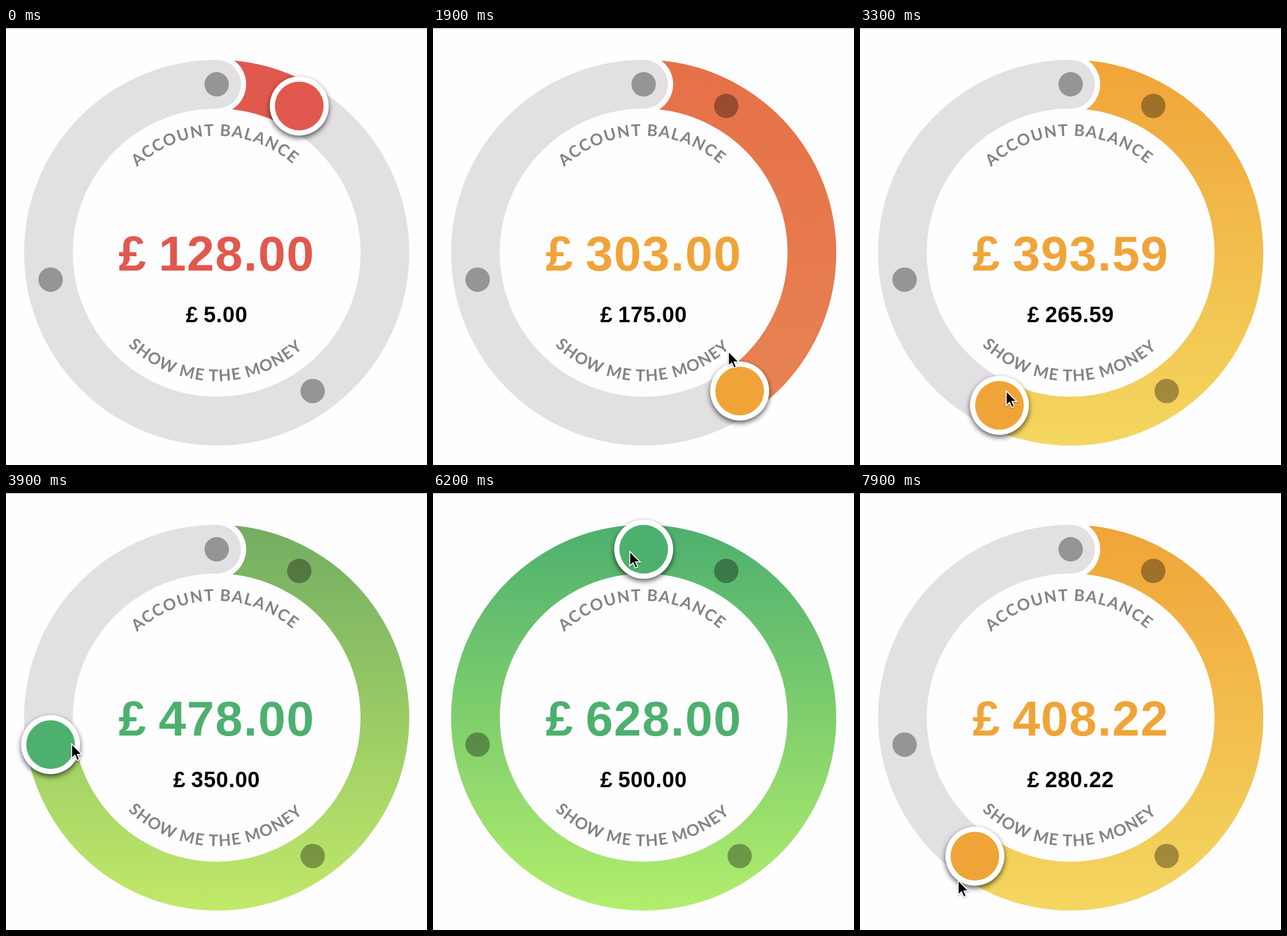
Write an HTML page that moves like this. It is 735 px wide and 762 px high and loops after 8 s.

```html
<!DOCTYPE html>
<html lang="en">
<head>
<meta charset="utf-8">
<title>Account dial</title>
<style>
  html, body { margin: 0; width: 100%; height: 100%; overflow: hidden; background: #fefdff; }
  svg { display: block; }
  .label { font: 700 28px Lato, sans-serif; fill: #858285; text-anchor: middle; }
  .money { font-family: "Liberation Sans", Arial, sans-serif; font-weight: 700; text-anchor: middle; }
  #total { font-size: 86px; letter-spacing: 1.6px; word-spacing: -5px; }
  #amount { font-size: 38px; letter-spacing: .7px; word-spacing: -2px; }
  #knob { filter: drop-shadow(0 4px 5px rgba(0, 0, 0, .65)); }
  #cursor { filter: drop-shadow(0 1px 1px rgba(0, 0, 0, .35)); }
</style>
</head>
<body>
<svg width="735" height="762" viewBox="0 0 735 762">
  <defs>
    <linearGradient id="fade" gradientUnits="userSpaceOnUse" x1="0" y1="-336" x2="0" y2="336">
      <stop id="stop0"/><stop id="stop1" offset="1"/>
    </linearGradient>
    <path id="upper" d="M-204 0A204 204 0 0 1 204 0"/>
    <path id="lower" d="M-224 0A224 224 0 0 0 224 0"/>
  </defs>
  <rect width="735" height="1" fill="#b4b3b4"/>

  <g transform="translate(367.8 391.8)">
    <g fill="none" stroke-width="85">
      <circle r="293.7" stroke="#e3e0e4"/>
      <path id="arc" d="M0-293.7a293.7 293.7 0 1 1-.01 0" pathLength="360" stroke="url(#fade)"/>
    </g>
    <path d="M0-345.2a51.5 51.5 0 0 1 0 103z" fill="#fefdff"/>
    <circle cy="-293.7" r="42.5" fill="#e3e0e4"/>
    <g id="dots" fill-opacity=".34"></g>

    <text class="label" letter-spacing="1.9" transform="rotate(-.9)">
      <textPath href="#upper" startOffset="50%">ACCOUNT BALANCE</textPath>
    </text>
    <text class="label" letter-spacing="1.6" transform="rotate(.6)">
      <textPath href="#lower" startOffset="50%">SHOW ME THE MONEY</textPath>
    </text>
    <text id="total" class="money" y="31"></text>
    <text id="amount" class="money" y="121"></text>

    <g id="knob">
      <circle r="51.5" fill="#fff"/>
      <circle id="face" r="42.5"/>
    </g>
    <path id="cursor" d="M0 0V25.5L5.8 20 9.8 29 14 27.2 10.2 18.4H18.3Z" stroke="#fff" stroke-width="1.8"/>
  </g>
</svg>
<script>
const $ = id => document.getElementById(id);
const LOOP = 8000, STEP = 100, FADE = 400, GRAB = 900;
const RADIUS = 293.7, OPENING = 128, SNAP = 7;

// Marked positions: angle clockwise from the top, and the amount there
const marks = [[29.4, 5], [145.2, 175], [260.8, 350], [360, 500]];

// The drag: time, pointer angle, pointer radius
const drag = [
  [GRAB, 29.4, 285], [1800, 138, 226], [2700, 150, 235], [3300, 205.04, 266],
  [3700, 255, 257], [4200, 267, 258], [5400, 354, 291], [6200, 355.2, 291],
  [6700, 270, 293], [7100, 258, 295], [7900, 214.706, 345]
];

// Top and bottom of the arc gradient, and when each palette begins
const red = [[225, 88, 78], [227, 95, 77]];
const orange = [[240, 164, 56], [244, 215, 96]];
const green = [[77, 176, 110], [178, 238, 108]];
const themes = [[-FADE, red], [1830, orange], [3690, green], [6710, orange]];

const clamp = x => Math.max(0, Math.min(1, x));
const mix = (a, b, k) => a + (b - a) * k;
const rgb = c => `rgb(${c.map(Math.round)})`;

// Linear interpolation between rows keyed by their first column
function along(rows, x) {
  const i = Math.max(1, rows.findIndex(row => row[0] >= x));
  const a = rows[i - 1], b = rows[i], k = clamp((x - a[0]) / (b[0] - a[0]));
  return a.slice(1).map((v, j) => mix(v, b[j + 1], k));
}

function polar(angle, r) {
  const a = angle * Math.PI / 180;
  return [r * Math.sin(a), -r * Math.cos(a)];
}

function place(id, angle, r) {
  $(id).setAttribute('transform', `translate(${polar(angle, r)})`);
}

// The knob follows the pointer but sticks to a nearby mark
function snap(angle) {
  const mark = marks.find(([at]) => Math.abs(at - angle) < SNAP);
  return mark ? mark[0] : angle;
}

function paint(t) {
  const i = themes.findLastIndex(([start]) => start <= t);
  const [start, theme] = themes[i], before = themes[Math.max(0, i - 1)][1];
  const k = 1 - (1 - clamp((t - start) / FADE)) ** 2;
  theme.forEach((c, n) =>
    $('stop' + n).setAttribute('stop-color', rgb(c.map((v, j) => mix(before[n][j], v, k)))));
  for (const id of ['total', 'face']) $(id).setAttribute('fill', rgb(theme[0]));
}

function draw(t) {
  const [aim, reach] = along(drag, t);
  const angle = snap(aim), [amount] = along(marks, angle);
  const total = t < GRAB ? OPENING : OPENING + amount;

  paint(t);
  $('arc').setAttribute('stroke-dasharray', `${angle} 360`);
  $('total').textContent = '£ ' + total.toFixed(2);
  $('amount').textContent = '£ ' + amount.toFixed(2);
  place('knob', angle, RADIUS);
  place('cursor', aim, reach);
  $('cursor').style.visibility = t < GRAB ? 'hidden' : 'visible';
}

$('dots').innerHTML = marks.map(([angle]) => {
  const [x, y] = polar(angle, RADIUS);
  return `<circle cx="${x}" cy="${y}" r="21.3"/>`;
}).join('');

const begin = performance.now();
function tick() {
  const t = (performance.now() - begin) % LOOP;
  draw(Math.floor(t / STEP) * STEP);
  requestAnimationFrame(tick);
}
tick();
</script>
</body>
</html>
```
